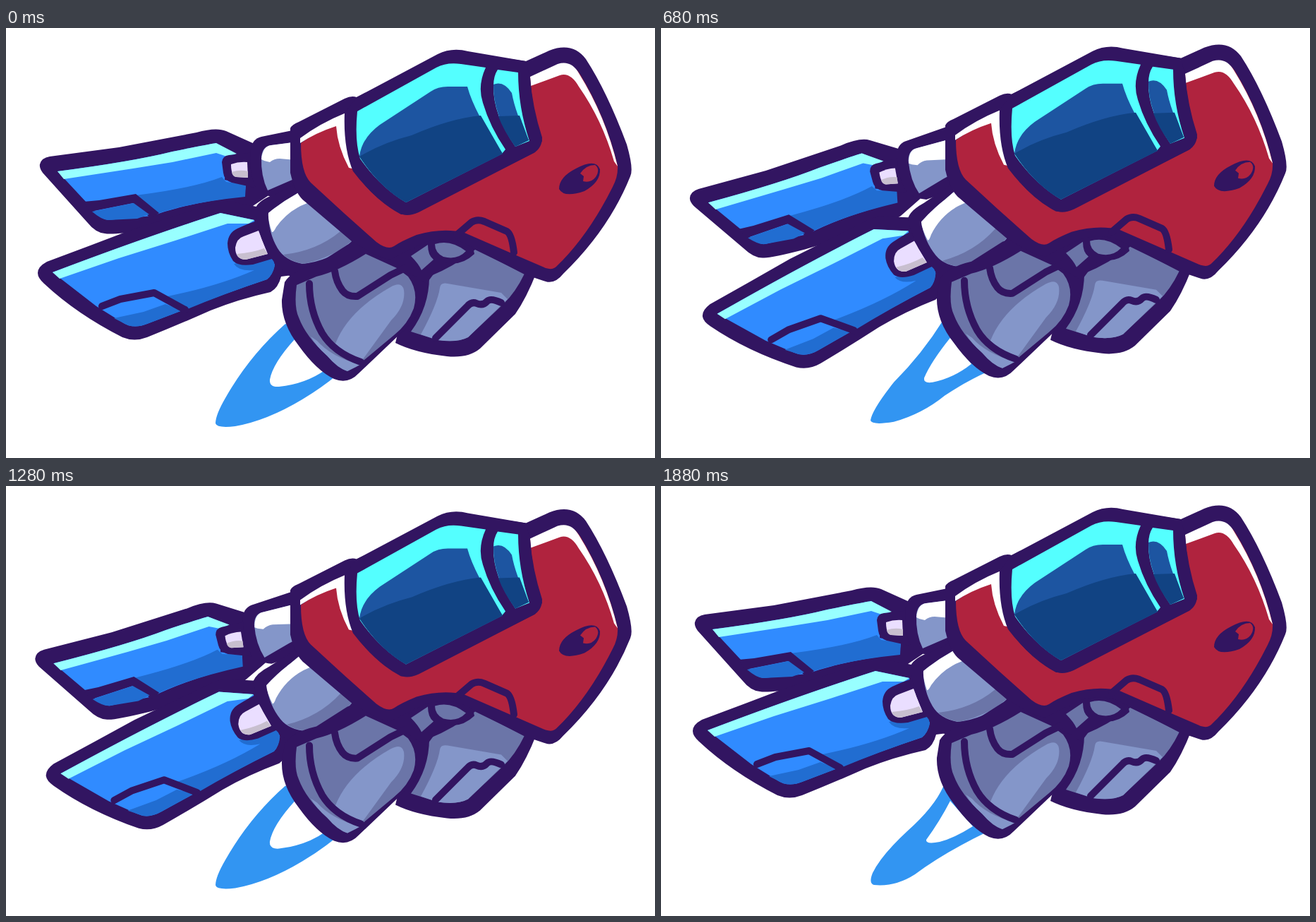
Write an HTML page that moves like this. It is 920 by 609 pixels and loops after 1.92 s.

```html
<!DOCTYPE html>
<html lang="en">
<head>
<meta charset="utf-8">
<title>Flying ship</title>
<style>
  html, body { margin: 0; width: 100%; height: 100%; overflow: hidden; background: #fff; }
  svg { display: block; width: 100%; height: 100%; }
  .ink { fill: #321561; }
  .line { fill: none; stroke: #321561; stroke-width: 10; stroke-linejoin: round; stroke-linecap: round; }
  .red { fill: #b0233e; }
  .white { fill: #fff; }
  .blue { fill: #308bff; }
  .navy { fill: #216dd1; }
  .ice { fill: #98ffff; }
  .cyan { fill: #54ffff; }
  .glass { fill: #1d55a1; }
  .deep { fill: #114383; }
  .steel { fill: #8496c9; }
  .slate { fill: #6b75a8; }
  .lilac { fill: #eadeff; }
  .ash { fill: #c8bfcf; }
  .fire { fill: #3295f2; }
</style>
</head>
<body>
<svg viewBox="0 0 920 609">
  <g id="ship">
    <g class="flame">
      <path class="fire" d="M396 419Q345 464 311 524Q297 548 297 560Q299 567 325 564Q370 556 420 526Q450 508 472 489L425 430Z"/>
      <path class="white" d="M410 440Q378 475 374 498Q373 509 387 508Q425 504 453 484Q426 465 410 440Z"/>
    </g>
    <g class="flame">
      <path class="fire" d="M400 418Q370 466 330 506Q299 545 297 560Q299 567 330 562Q370 551 402 525Q430 506 465 490Z"/>
      <path class="white" d="M410 443Q382 478 373 500Q372 508 385 506Q415 500 440 480Z"/>
    </g>
    <g class="flame">
      <path class="fire" d="M400 426Q387 455 350 488Q312 523 300 548Q294 563 302 565Q332 568 360 550Q400 520 462 490L425 430Z"/>
      <path class="white" d="M410 446Q395 475 376 501Q375 508 395 504Q415 499 442 482Z"/>
    </g>

    <g id="farWing">
      <path class="ink" d="M48 193Q50 184 62 182L160 169L270 148Q298 140 312 146L352 164L400 200L371 238L341 258L318 268L200 287Q150 293 140 291Q127 290 115 275L52 205Q47 198 48 193Z"/>
      <path class="blue" d="M73 203Q180 189 236 175Q285 165 298 163L325 178L312 190L310 215L340 222L338 238Q260 247 207 266L145 272Q136 271 128 262Z"/>
      <path class="navy" d="M184 237Q265 227 306 211L312 218L340 222L339 239Q260 247 211 264Z"/>
      <path class="ice" d="M73 203Q180 189 236 175Q285 165 298 163L327 178L313 182L298 177L236 190L180 199L82 214Z"/>
      <path class="ink" d="M110 246L132 244L184 235L217 262L206 270L180 248L120 260Z"/>
      <path class="navy" d="M122 260L146 255L181 248L203 264L186 270L145 272Q136 272 122 260Z"/>
      <path class="ink" d="M306 190Q307 181 316 180L352 176V226L320 219Q309 215 308 205Z"/>
      <path class="lilac" d="M319 193Q330 189 342 190L343 212L326 211Q319 209 319 193Z"/>
      <path class="ash" d="M320 204Q332 200 343 203V212L326 211Q321 210 320 204Z"/>
      <path class="ink" d="M347 172Q349 157 362 154L450 136V225L380 240Q360 236 352 222Q344 200 347 172Z"/>
      <path class="steel" d="M362 182Q364 167 376 166L445 157V200L408 214L371 230Q361 210 362 182Z"/>
      <path class="white" d="M362 186Q364 167 376 166L445 157V190L388 185Q380 185 374 190L366 188Z"/>
    </g>

    <g id="nearWing">
      <path class="ink" d="M45 347Q45 338 58 331Q120 308 180 285L290 250Q305 243 325 247L360 254L445 300V345L390 352Q386 368 375 374Q330 384 290 400Q245 420 200 438Q182 445 165 438Q100 405 54 362Q45 354 45 347Z"/>
      <path class="blue" d="M66 346Q140 318 200 297Q260 276 304 262L352 272L358 300L381 335Q378 350 370 356Q310 376 255 398L200 419Q180 427 165 417L128 394Z"/>
      <path class="navy" d="M224 381Q300 366 352 343Q330 345 323 334L378 322L381 337Q378 350 370 356Q310 376 255 399Z"/>
      <path class="ice" d="M66 346Q140 318 200 297Q260 276 304 262L352 272L344 277L314 277L240 301L160 326L76 355Z"/>
      <path class="navy" d="M153 411L195 402L226 391L250 400L200 419Q180 427 165 417Z"/>
      <path class="line" d="M136 394L162 384L210 375L254 399"/>
      <path class="ink" d="M314 305Q315 290 328 284Q345 276 365 270L387 324L350 335Q330 338 322 330Q314 318 314 305Z"/>
      <path class="lilac" d="M325 311Q327 298 337 295L358 287L371 320L340 328Q325 328 325 311Z"/>
      <path class="ash" d="M327 320Q350 318 366 312L371 320L340 328Q330 328 327 320Z"/>
      <path class="ink" d="M354 254Q360 243 380 236L410 222L460 195L505 300L470 350Q440 362 415 358Q384 345 368 312Q355 285 354 254Z"/>
      <path class="steel" d="M372 262Q390 247 410 236L455 208L500 292L488 304Q460 330 420 334Q395 329 385 312Q372 290 372 262Z"/>
      <path class="slate" d="M393 321Q440 316 474 288L500 278V292Q470 324 422 334Q402 330 393 321Z"/>
      <path class="white" d="M372 262Q390 247 410 236L455 208V240L427 248Q400 258 383 282Q379 290 377 289Q371 272 372 262Z"/>
    </g>

    <path class="ink" d="M556 430L600 320L645 295L720 320L752 346Q738 382 722 405L672 454Q655 468 625 465Q580 460 552 446Z"/>
    <path class="slate" d="M574 430Q600 395 600 352Q635 338 665 314L735 348Q722 375 705 391L655 438Q640 446 612 442Z"/>
    <path class="steel" d="M588 434Q612 390 615 368Q616 360 626 362L702 375L711 384L655 438Q640 446 612 442Z"/>
    <path class="line" d="M609 439L654 394Q660 387 667 390Q676 394 682 387Q687 382 702 389"/>

    <path class="ink" d="M395 360Q405 343 440 335L484 307L540 285L610 290L602 342Q596 378 588 397Q580 415 560 432L500 489Q485 505 465 497Q440 485 415 450Q390 418 391 385Z"/>
    <path class="slate" d="M412 364Q408 395 415 410Q425 437 455 464Q475 484 484 486L496 480L550 435Q570 419 578 397Q585 372 570 352L554 340L510 320Q470 345 440 352Z"/>
    <path class="steel" d="M441 443Q460 465 502 477L484 486Q470 482 455 464Q440 451 432 437Z"/>
    <path class="steel" d="M467 447Q485 401 545 367Q561 358 564 371Q567 393 546 414L506 469Q479 461 467 447Z"/>
    <path class="line" d="M430 362Q430 400 448 432Q465 460 503 473"/>
    <path class="line" d="M466 344Q468 360 477 372Q484 381 498 380L545 350L574 336"/>
    <path class="ink" d="M570 318L604 296L660 300L664 320Q645 338 622 332L605 350L596 362L570 346Z"/>
    <path class="slate" d="M574 323L598 307Q598 322 606 328L589 343Q585 334 574 323Z"/>
    <path class="slate" d="M608 306Q630 299 652 316Q640 329 620 324Q608 318 608 306Z"/>

    <path class="ink" d="M403 142Q405 137 415 133L480 100Q490 95 497 98L612 37Q632 27 655 33L737 47L770 32Q803 19 822 44Q852 90 880 165Q890 200 885 210Q855 285 790 348Q778 363 765 359L735 349L650 305Q625 294 592 304Q570 315 545 328Q530 327 490 302L424 246Q410 236 403 205Z"/>
    <path class="red" d="M418 163L480 121Q478 170 490 198Q520 243 560 264L575 264L750 176L760 160Q745 110 743 70L785 53Q803 48 814 66Q850 125 867 195Q868 210 860 225Q825 295 780 338Q775 343 765 340L728 324L650 290Q620 282 582 293Q560 302 550 309Q541 315 525 303L480 263L432 219Q418 205 418 163Z"/>
    <path class="white" d="M417 163V156Q445 135 482 120L495 200L486 198Q470 168 468 139Q440 148 417 163Z"/>
    <path class="white" d="M743 69L782 51Q801 45 812 64Q850 125 867 196L862 189Q845 130 812 83Q800 62 785 67L744 82Z"/>
    <path class="line" d="M639 293L660 275Q668 270 678 274L710 288Q717 292 720 318"/>

    <path class="ink" d="M480 120L497 98L632 32L737 47L743 70Q746 112 760 155Q760 170 748 177L585 261Q567 269 556 261Q520 240 492 203Q478 170 480 120Z"/>
    <path class="cyan" d="M498 118L610 56Q625 48 645 51L680 56Q668 82 676 106Q686 140 708 172L703 178L567 247Q530 225 502 185Q494 160 498 118Z"/>
    <path class="glass" d="M501 182Q504 156 530 137L602 90Q613 82 630 83L654 83Q664 120 704 178L567 247Q530 226 501 182Z"/>
    <path class="deep" d="M501 182Q535 162 575 152Q630 128 673 124L704 178L567 247Q530 226 501 182Z"/>
    <path class="cyan" d="M697 59L726 63Q726 112 742 160L722 168Q690 122 691 82Q691 68 697 59Z"/>
    <path class="glass" d="M691 80Q705 74 717 92Q722 120 741 159L722 168Q690 122 691 80Z"/>
    <path class="deep" d="M698 125L728 124L741 159L722 168Q705 145 698 125Z"/>
    <path class="ink" d="M784 228Q784 211 808 199Q836 184 842 200Q843 218 820 231Q791 241 784 228Z"/>
    <path class="red" d="M814 206Q822 194 835 194Q843 200 836 211Q829 220 818 217L819 210Z"/>
  </g>
</svg>
<script>
  const LOOP = 1920, STEP = 40, SWING = 945, FLICKER = 392;
  const ship = document.getElementById("ship");
  const farWing = document.getElementById("farWing");
  const nearWing = document.getElementById("nearWing");
  const flames = document.querySelectorAll(".flame");

  const smooth = p => p * p * (3 - 2 * p);

  // Eases through evenly spaced values, resting at the last one.
  function track(t, span, values) {
    const i = Math.floor(t / span);
    if (i >= values.length - 1) return values[values.length - 1];
    return values[i] + (values[i + 1] - values[i]) * smooth(t / span - i);
  }

  function draw(t) {
    const bob = track(t, SWING / 2, [0, -7, 0, 7, 0]);
    const swing = track(t, SWING, [0, 1, 0]);
    ship.setAttribute("transform", `translate(0 ${bob})`);
    farWing.setAttribute("transform", `rotate(${-9.5 * swing} 431 272)`);
    nearWing.setAttribute("transform", `rotate(${-11 * swing} 478 290)`);

    const phase = t % FLICKER / FLICKER;
    const lit = phase < 0.38 ? 0 : phase < 0.755 ? 1 : 2;
    flames.forEach((f, i) => f.style.display = i === lit ? "" : "none");
  }

  const start = performance.now();
  function tick() {
    const t = (performance.now() - start) % LOOP;
    draw(Math.floor(t / STEP) * STEP);
    requestAnimationFrame(tick);
  }
  tick();
</script>
</body>
</html>
```
